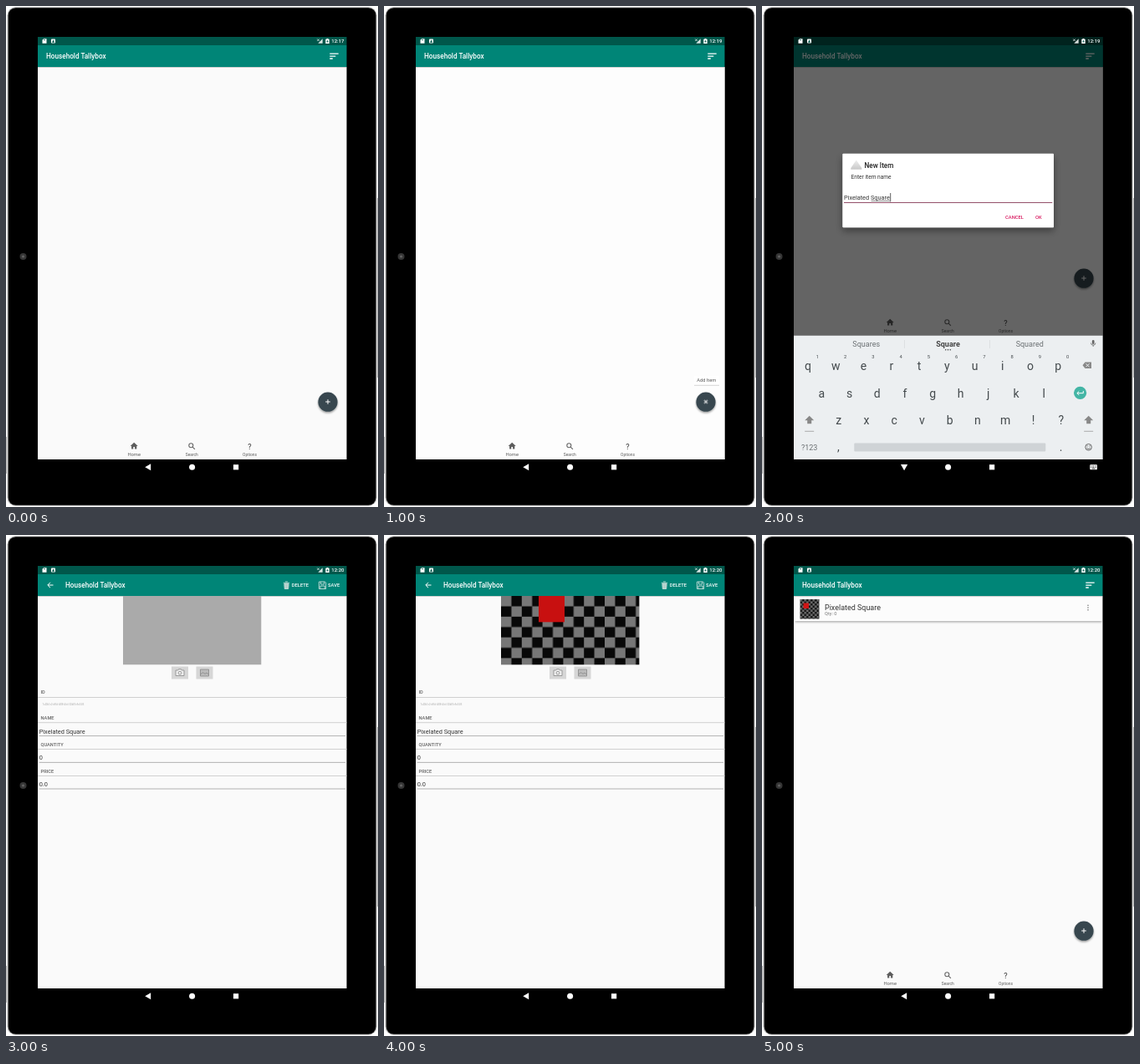
An HTML page that plays this animation: 445x600 px, repeating every 6 s.

```html
<!DOCTYPE html>
<html lang="en">
<head>
<meta charset="utf-8">
<title>Inventory app demo</title>
<style>
html, body { margin: 0; width: 100%; height: 100%; overflow: hidden; background: #fff; }
svg { display: block; width: 445px; height: 600px; font-family: Roboto, sans-serif; }
.medium { font-weight: 500; }
.title { font-size: 8.2px; font-weight: 500; fill: #fff; }
.action { font-size: 5.8px; font-weight: 500; }
.section { font-size: 5.7px; font-weight: 500; fill: #666; }
.value { font-size: 7.36px; fill: #333; }
.mid { text-anchor: middle; }
.line { fill: none; stroke-linecap: butt; }

/* One-second scenes in a six-second loop */
.slot, .home, .detail, .lift, .plus, .early, .noon, .late { animation: 6s step-end infinite; }
.slot { animation-name: slot; animation-delay: calc((var(--at) - 6) * 1s); }
.home { animation-name: home; }
.detail { animation-name: detail; }
.lift { animation-name: lift; }
.plus { animation-name: plus; transform-origin: 385px 474px; }
.noon { animation-name: noon; }
.late { animation-name: late; }
.resting { animation: resting 6s step-end infinite; }
@keyframes slot { 0% { opacity: 1 } 16.6666% { opacity: 0 } 100% { opacity: 0 } }
@keyframes home { 0% { opacity: 1 } 50% { opacity: 0 } 83.3333% { opacity: 1 } 100% { opacity: 1 } }
@keyframes detail { 0% { opacity: 0 } 50% { opacity: 1 } 83.3333% { opacity: 0 } 100% { opacity: 0 } }
@keyframes lift { 0% { transform: none } 33.3333% { transform: translateY(-148px) } 50% { transform: none } 100% { transform: none } }
@keyframes plus { 0% { transform: none } 16.6666% { transform: rotate(45deg) } 33.3333% { transform: none } 100% { transform: none } }
@keyframes noon { 0% { opacity: 0 } 16.6666% { opacity: 1 } 50% { opacity: 0 } 100% { opacity: 0 } }
@keyframes late { 0% { opacity: 0 } 50% { opacity: 1 } 100% { opacity: 1 } }
@keyframes resting { 0% { opacity: 1 } 33.3333% { opacity: 0 } 50% { opacity: 1 } 100% { opacity: 1 } }
</style>
</head>
<body>
<svg viewBox="0 0 445 600">
  <defs>
    <pattern id="checker" x="140" y="73" width="24.8" height="24.8" patternUnits="userSpaceOnUse">
      <path fill="#080808" d="M0 0h24.8v24.8H0z"/>
      <path fill="#777" d="M0 0h12.4v12.4H0zM12.4 12.4h12.4v12.4H12.4z"/>
    </pattern>
    <pattern id="tinyChecker" x="45.5" y="77" width="5" height="5" patternUnits="userSpaceOnUse">
      <path fill="#111" d="M0 0h5v5H0z"/>
      <path fill="#707070" d="M0 0h2.5v2.5H0zM2.5 2.5h2.5v2.5H2.5z"/>
    </pattern>
    <linearGradient id="cone" x2="0" y2="1">
      <stop stop-color="#eee"/><stop offset="1" stop-color="#c8c8c8"/>
    </linearGradient>
    <filter id="soft" x="-30%" y="-30%" width="160%" height="160%">
      <feDropShadow dx="0" dy="1.5" stdDeviation="1.3" flood-opacity=".4"/>
    </filter>
    <filter id="deep" x="-15%" y="-30%" width="130%" height="170%">
      <feDropShadow dx="0" dy="4" stdDeviation="4" flood-opacity=".4"/>
    </filter>
    <g id="shift">
      <path fill="#888" d="M0-5.5 5.5 0H2.5V4H-2.5V0H-5.5z"/>
      <path stroke="#aaa" d="M-5.5 13H5.5"/>
    </g>
  </defs>

  <!-- Tablet -->
  <rect x="1.5" y="1.2" width="442" height="597.6" rx="10" fill="#aaa"/>
  <rect x="2.7" y="2.2" width="439.8" height="595.6" rx="9" fill="#000"/>
  <path stroke="#bbb" d="M.5 516V560M444.5 230V445"/>
  <circle cx="20.5" cy="300" r="4" fill="#363636"/>
  <circle cx="20.5" cy="300" r="1.6" fill="#606060"/>

  <path fill="#fafafa" d="M38 73H407.500V543H38z"/>
  <path fill="#fff" opacity=".6" class="white" d="M0 0"/>
  <g class="slot" style="--at:1"><path fill="#fdfdfd" d="M38 73H407.500V543H38z"/></g>
  <path fill="#000" opacity=".16" d="M38 73H407.500v.9H38z"/>
  <path fill="#00574b" d="M38 37H407.500V47H38z"/>
  <path fill="#008577" d="M38 47H407.500V73H38z"/>

  <g class="home">
    <text class="title" x="48" y="63.300">Household Tallybox</text>
    <path class="line" stroke="#fff" stroke-width="1.300" d="M387.300 57.200H397.700M387.300 60.100H394.300M387.300 63H390.800"/>

    <g class="slot" style="--at:5">
      <rect x="39.500" y="75" width="367" height="28" rx="1" fill="#fcfcfc" filter="url(#soft)" opacity=".75"/>
      <path fill="#fcfcfc" d="M39.500 75h367v28h-367z"/>
      <path fill="url(#tinyChecker)" d="M45.500 77h23v23.500h-23z"/>
      <path fill="#d01515" d="M49.500 81.500h6.500v6.500h-6.500z"/>
      <text x="75" y="89.500" font-size="8.970" fill="#333">Pixelated Square</text>
      <text x="75" y="96" font-size="5.700" fill="#777">Qty: 0</text>
      <g fill="#777"><circle cx="390" cy="84.300" r=".8"/><circle cx="390" cy="87" r=".8"/><circle cx="390" cy="89.700" r=".8"/></g>
    </g>

    <g class="lift">
      <g fill="#5c5c5c" class="mid">
        <path d="M153.200 522.800 157.700 527H156.300V530.600H154.100V528H152.300V530.600H150.100V527H148.700z"/>
        <g class="line" stroke="#666" stroke-width="1.100"><circle cx="221.300" cy="526.300" r="2.500"/><path d="m223.200 528.200 2.700 2.700"/></g>
        <text x="153.200" y="538.700" font-size="5.800">Home</text>
        <text x="222.300" y="538.500" font-size="4.900">Search</text>
        <text x="291.500" y="538.500" font-size="4.900">Options</text>
        <text x="291.500" y="530.800" font-size="9" class="medium">?</text>
      </g>
      <circle cx="385" cy="474.200" r="11.600" fill="#37474f" filter="url(#soft)"/>
      <path class="line plus" stroke="#fff" d="M382.200 474H387.800M385 471.200V476.800"/>
    </g>

    <g class="slot" style="--at:1">
      <rect x="371" y="443" width="30" height="11" rx="1" fill="#fff"/>
      <path stroke="#ccc" stroke-width=".8" d="M371 454.300H401"/>
      <text class="mid" x="385.700" y="450.300" font-size="5.700" fill="#555">Add Item</text>
    </g>
  </g>

  <g class="detail">
    <text class="title" x="71" y="63.300">Household Tallybox</text>
    <path class="line" stroke="#fff" d="M56.500 60H50M53 56.800 49.800 60 53 63.200"/>
    <g class="action" fill="#fff"><text x="341.800" y="62.300">DELETE</text><text x="385" y="62.300">SAVE</text></g>
    <g class="line" stroke="#c9dedb" stroke-width=".9">
      <path fill="#9fc4bf" d="M332.800 58.500H338.200L337.700 64.500H333.300z"/>
      <path d="M331.800 57.300H339.200M334 56H337M334.700 59V64M336.300 59V64"/>
      <path d="M374.500 56H381.500L382.700 57.200V64.500H374.500zM376.500 56V59H380.700V56M376 64.500V61H381.300V64.500"/>
    </g>

    <path fill="#aaa" d="M140 73H305.300V155.300H140z"/>
    <g class="slot" style="--at:4">
      <path fill="url(#checker)" d="M140 73H305.300V155.300H140z"/>
      <path fill="#c81010" d="M185 73H216V104.300H185z"/>
    </g>
    <path fill="#d6d6d6" d="M198 157.500h20v15h-20zM227.500 157.500h20v15h-20z"/>
    <g class="line" stroke="#888" stroke-width=".8">
      <path fill="#eee" d="M203 162H205.700L206.500 160.700H209.500L210.300 162H213V168.500H203z"/><circle cx="208" cy="165.200" r="1.900"/>
      <path fill="#bbb" d="M232.500 161H242.500V169H232.500zM232.500 167 235.500 164.700 238 166.300 240 165 242.500 167"/>
    </g>

    <g class="section">
      <text x="41.500" y="190.300">ID</text>
      <text x="41.500" y="221">NAME</text>
      <text x="41.500" y="252.700">QUANTITY</text>
      <text x="41.500" y="284.500">PRICE</text>
    </g>
    <text x="43.500" y="204.300" font-size="2.700" fill="#aaa">7c40b1e2-a95d-4f08-b3c6-20d81e9a74f5</text>
    <g class="value">
      <text x="39.700" y="237.500">Pixelated Square</text>
      <text x="39.700" y="269.200">0</text>
      <text x="39.700" y="301">0.0</text>
    </g>
    <path stroke="#d0d0d0" d="M38 194.500H407.500M38 224.700H407.500M38 256.500H407.500M38 288.500H407.500"/>
    <path stroke="#a0a0a0" stroke-width=".8" d="M39.700 240.600H406M39.700 272.400H406M39.700 304H406"/>
  </g>

  <!-- New item dialog -->
  <g class="slot" style="--at:2">
    <path opacity=".6" d="M38 37H407.500V543H38z"/>
    <rect x="96.300" y="176.800" width="252.700" height="88.500" rx="1" fill="#fff" filter="url(#deep)"/>
    <path fill="url(#cone)" d="M112.800 184.500 119.300 194V195.700H106.300V194z"/>
    <text x="122.500" y="193.600" font-size="8.200" class="medium" fill="#222">New Item</text>
    <text x="106.500" y="207.400" font-size="6.600" fill="#333">Enter item name</text>
    <text class="value" x="98" y="232">Pixelated Square</text>
    <path stroke="#444" stroke-width=".6" d="M130.500 233.500H153"/>
    <path stroke="#333" stroke-width=".8" d="M153.700 224V234.500"/>
    <path stroke="#94506a" d="M98 235.500H347.300"/>
    <g class="action" fill="#d81b60"><text x="291" y="254.900">CANCEL</text><text x="327" y="254.900">OK</text></g>

    <path fill="#eceff1" d="M38 394.700H407.500V543H38z"/>
    <g class="mid" font-size="9" fill="#6b7073">
      <text x="124.700" y="407.700">Squares</text>
      <text x="222.500" y="407.700" font-weight="700" fill="#444">Square</text>
      <text x="320.200" y="407.700">Squared</text>
      <text x="56.700" y="531.700">?123</text>
    </g>
    <g fill="#444"><circle cx="219.700" cy="411.700" r=".8"/><circle cx="222.500" cy="411.700" r=".8"/><circle cx="225.300" cy="411.700" r=".8"/></g>
    <path stroke="#dde0e2" d="M170.500 400V410M272.500 400V410"/>
    <rect x="394.900" y="400" width="2.600" height="5" rx="1.300" fill="#666"/>
    <path class="line" stroke="#666" stroke-width=".8" d="M393.500 403.500a2.700 2.700 0 0 0 5.400 0M396.200 406.200V408"/>
    <g id="keys" class="mid" fill="#444a4d"></g>
    <rect x="110.300" y="523.500" width="229" height="10" rx="1" fill="#cfd3d6"/>
    <path fill="#888" d="M383.500 430.300 386.500 426.500H394V434.100H386.500z"/>
    <path stroke="#eceff1" d="m387.500 428.300 4 4m0-4-4 4"/>
    <circle cx="380.600" cy="463.300" r="7.600" fill="#43b5a5"/>
    <path class="line" stroke="#fff" d="M384.300 461V463.700H377M379.300 461.300 376.900 463.700 379.300 466.100"/>
    <use href="#shift" x="56.700" y="496.300"/>
    <use href="#shift" x="390.700" y="496.300"/>
    <g class="line" stroke="#555" stroke-width=".9"><circle cx="390.600" cy="528.300" r="3.800"/><path d="M388.500 529.300q2.100 2.400 4.200 0M389.200 526.300v1.200M392 526.300v1.200"/></g>
  </g>

  <!-- Status icons -->
  <g fill="#fff">
    <path d="M43.500 40.800 45 39.300H48.500V44.700H43.500z"/>
    <rect x="54" y="39.500" width="5" height="5" rx=".8"/>
    <path fill="#00574b" d="m56.500 40.300 1.500 3.400h-3zM45 40h.6v1.300H45zM46.300 40h.6v1.300h-.6z"/>
    <path opacity=".85" d="M378.700 39.300V44.700H373.300z"/>
    <path class="line" stroke="#fff" stroke-width=".8" d="m372.300 39.500 2.400 2.400m0-2.400-2.400 2.400"/>
    <path d="M382.300 39.800H383.500V39H385.500V39.800H386.700V45H382.300z"/>
    <path fill="#00574b" d="M384.800 40.500 383.300 42.800H384.300V44.300L385.700 42H384.800z"/>
    <g font-size="6" class="medium">
      <text class="slot" style="--at:0" x="389.300" y="44.200">12:17</text>
      <text class="noon" x="389.300" y="44.200">12:19</text>
      <text class="late" x="389.300" y="44.200">12:20</text>
    </g>
  </g>

  <!-- System navigation -->
  <g fill="#fff">
    <path class="resting" d="M166.300 552.300 173.200 548.300V556.300z"/>
    <circle cx="222.600" cy="552.300" r="3.500"/>
    <path d="M272 549.200h6.200v6.200H272z"/>
    <g class="slot" style="--at:2">
      <path d="M166 549H174.200L170.100 556.300z"/>
      <rect x="392.300" y="549.300" width="8.600" height="6" rx=".7"/>
      <path class="line" stroke="#000" stroke-width=".7" stroke-dasharray=".8 .6" d="M393.400 550.900H400M393.400 552.400H400"/>
      <path stroke="#000" stroke-width=".7" d="M394.700 554H398.600"/>
    </g>
  </g>
</svg>
<script>
const pitch = 33.25;
const keys = document.getElementById('keys');

function addRow(letters, x, y, size) {
  [...letters].forEach((letter, i) => {
    const key = document.createElementNS('http://www.w3.org/2000/svg', 'text');
    key.setAttribute('x', x + i * pitch);
    key.setAttribute('y', y);
    key.setAttribute('font-size', size);
    key.textContent = letter;
    keys.append(key);
  });
}

addRow('qwertyuiop', 55, 435.5, 14);
addRow('1234567890', 66.5, 422, 5.8);
addRow('asdfghjkl', 71.3, 468.5, 14);
addRow('zxcvbnm!?', 91.7, 501, 14);
addRow(',', 91.5, 532.5, 14);
addRow('.', 357.5, 532.5, 14);
</script>
</body>
</html>
```
